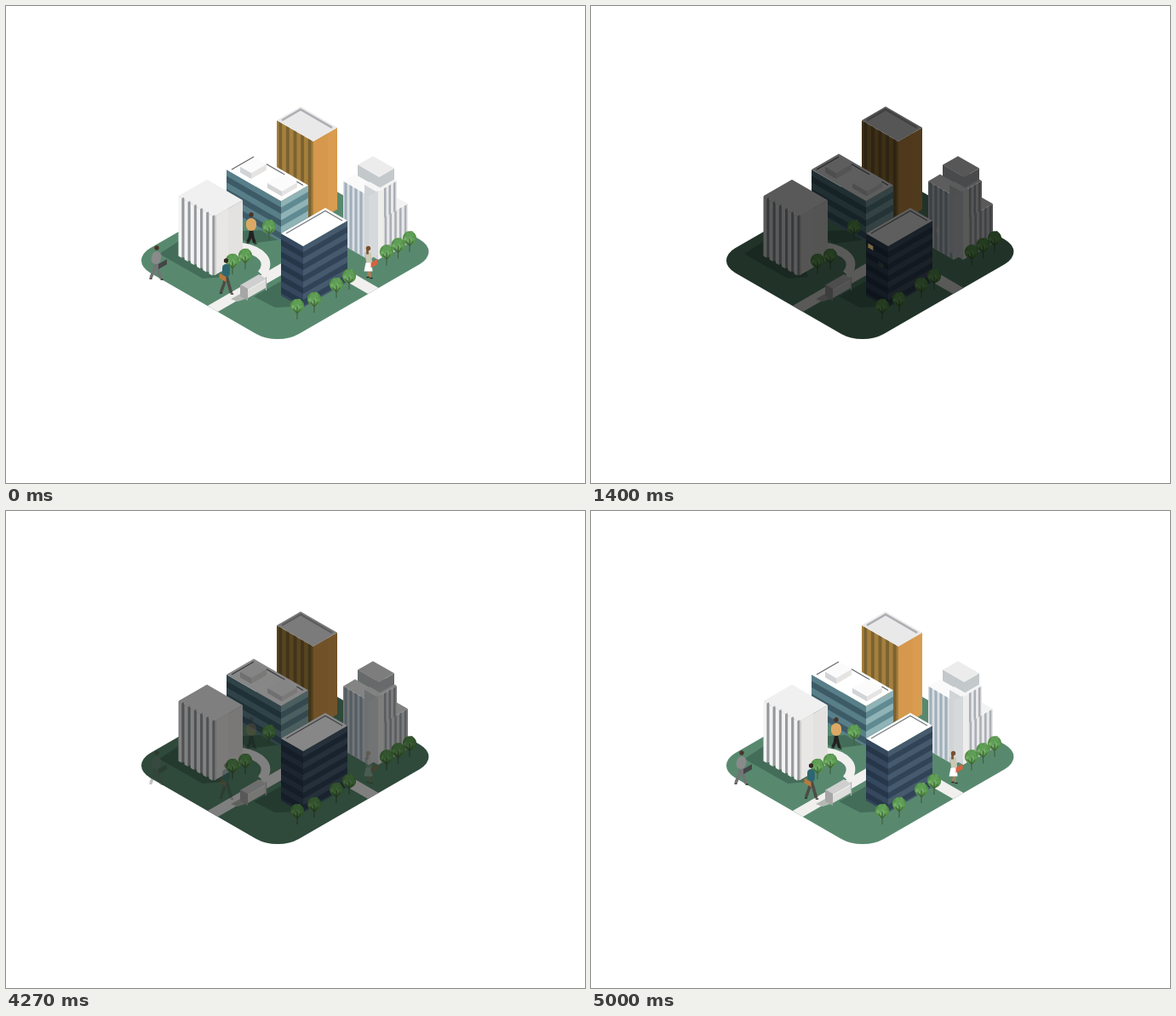
Recreate the animation shown at these times as an HTML page. Size 680 px wide and 560 px high, loop 7.07 s.

```html
<!DOCTYPE html>
<html lang="en">
<head>
<meta charset="utf-8">
<title>City day and night</title>
<style>
html, body { margin: 0; width: 100%; height: 100%; overflow: hidden; background: #fff; }
svg { position: absolute; left: 0; top: 0; width: 680px; height: 560px; }
#city { animation: dusk 7070ms infinite; }
.person { animation: walkers 7070ms infinite; }
.light { opacity: 0; animation: glow 7070ms linear infinite both; }
@keyframes dusk {
  0%, .99% { filter: brightness(1); animation-timing-function: cubic-bezier(.37, 0, .63, 1); }
  19.8% { filter: brightness(.37); }
  55.16% { filter: brightness(.37); animation-timing-function: cubic-bezier(.37, 0, .63, 1); }
  70.72%, 100% { filter: brightness(1); }
}
@keyframes walkers {
  0%, 6.3% { opacity: 1; animation-timing-function: ease-in-out; }
  19.8% { opacity: 0; }
  56.9% { opacity: 0; animation-timing-function: ease-in-out; }
  65.8%, 100% { opacity: 1; }
}
@keyframes glow {
  0%, 19.2% { opacity: 0; }
  20.3%, 48.1% { opacity: 1; }
  49.2%, 100% { opacity: 0; }
}
</style>
</head>
<body>
<svg id="city" viewBox="0 0 680 560"></svg>
<svg id="lights" viewBox="0 0 680 560"></svg>
<script>
const K = .577; // isometric slope
let out = [], seed = 7;
const random = () => (seed = seed * 16807 % 2147483647) / 2147483647;
const poly = (pts, fill, more = '') => out.push(`<polygon points="${pts}" fill="${fill}" ${more}/>`);
const line = (d, color, w, more = '') =>
  out.push(`<path d="${d}" fill="none" stroke="${color}" stroke-width="${w}" ${more}/>`);
const dot = (x, y, r, fill) => out.push(`<circle cx="${x}" cy="${y}" r="${r}" fill="${fill}"/>`);

// Walls start at the front corner; negative w runs left, positive runs right.
const rise = (y, w) => y - K * Math.abs(w);
const wall = (x, y, w, h, fill, more) =>
  poly([x, y, x + w, rise(y, w), x + w, rise(y, w) + h, x, y + h], fill, more);
const roof = (x, y, l, r, fill) =>
  poly([x, y, x - l, rise(y, l), x - l + r, rise(y, l + r), x + r, rise(y, r)], fill);

function box(x, y, l, r, h, left, right, top) {
  wall(x, y, -l, h, left);
  wall(x, y, r, h, right);
  roof(x, y, l, r, top);
}

function rim(x, y, l, r, inset, color, w, more) {
  y -= 2 * K * inset; l -= 2 * inset; r -= 2 * inset;
  line(`M${x - l} ${rise(y, l)}L${x - l + r} ${rise(y, l + r)}L${x + r} ${rise(y, r)}`, color, w, more);
}

function floors(x, y, w, h, step, light, dark) {
  wall(x, y, w, h, light);
  for (let v = step / 2; v < h; v += step) wall(x, y + v, w, Math.min(step / 2, h - v), dark);
}

function stripes(x, y, w, h, count, light, dark, share = .45) {
  wall(x, y, w, h, light);
  for (let i = 0; i < count; i++) {
    const start = w * (i + .5 - share / 2) / count;
    wall(x + start, rise(y, start), w * share / count, h, dark);
  }
}

function ground() {
  const flat = (x, y, w, h, fill, rx = 0) => out.push(
    `<rect x="${x}" y="${y}" width="${w}" height="${h}" rx="${rx}" fill="${fill}" transform="matrix(1 ${K} -1 ${K} 0 0)"/>`);
  const shade = '#446d59', road = '#f1f0ef';
  flat(331, -5.5, 174.6, 192.2, '#58896f', 25);
  poly('203,276 180,291 231,320 255,318 245,290', shade);
  poly('278,264 278,274 286,279 325,274 325,262', shade);
  poly('325,322 291,341 316,354 340,353', shade);
  flat(423.5, 68, 12, 118.7, road);
  flat(423.5, 68, 82.1, 12.4, road);
  line('M276 283C300 287 313 300 300 315', road, 10.5);
}

function orangeTower() {
  stripes(361, 159, -43, 98, 5, '#a5803c', '#7b6233');
  wall(361, 159, 28, 96, '#d99c50');
  wall(361, 159, 17, 96, '#d5984c');
  roof(361, 159, 43, 28, '#e9e9ea');
  rim(361, 159, 43, 28, 3, '#adadb2', 2.4);
}

function tealOffice() {
  floors(323, 229, -64, 48, 15, '#587f89', '#3d5b67');
  floors(323, 229, 32, 48, 15, '#8fb3b6', '#608a92');
  roof(323, 229, 64, 32, '#fff');
  rim(323, 229, 64, 32, 3, '#62666b', 1.2, 'stroke-dasharray="30 17 25 16 10"');
  box(288, 196, 13, 18, 7, '#d2d4d6', '#e6e4e3', '#fbfbfb');
  box(324, 217.5, 17, 18, 6, '#d2d4d6', '#e6e4e3', '#fbfbfb');
}

function finOffice() {
  box(245, 247, 42, 33, 69, '#b4b6b8', '#e4e2e0', '#f0f0f0');
  wall(245, 247, 16, 69, '#e9e7e5');
  for (let x = 206.5; x < 246; x += 7.2)
    box(x, rise(248, 245 - x), 4, 2.6, 70, '#f4f4f4', '#96999c', '#f0f0f0');
  wall(245, 247, 2, 69, '#cfcdcc');
}

function whiteTowers() {
  roof(443, 249, 14, 29, '#f3f3f3');
  stripes(437, 218, 22, 50, 4, '#e8e8e8', '#a9aeb6');
  roof(437, 218, 18, 22, '#f3f3f3');
  box(438, 201, 25, 18, 13, '#c3c8ca', '#c4c9cb', '#ececec');
  wall(438, 201, -25, 20, '#c3c8ca');
  stripes(443, 249, 29, 47, 5, '#e8e8e8', '#aaafb6');
  roof(426, 223, 30, 14, '#fafafa');
  stripes(426, 223, -30, 75, 5, '#dadee1', '#9dafbb', .52);
  box(437, 219, 16, 6, 79, '#d0d4d6', '#ededec', '#f6f6f6');
  wall(426, 223, 11, 75, '#d6d9db');
}

function blueOffice() {
  floors(349, 282, -26, 73, 14, '#35485d', '#27374a');
  floors(349, 282, 52, 72, 14, '#465a6d', '#304357');
  roof(349, 282, 26, 52, '#fff');
  rim(349, 282, 26, 52, 3, '#73777c', 1.1);
}

function shelter() {
  poly('264,344 275,338 284,343 272,347', '#b4b8b3');
  wall(284, 334, 21, 9, '#dededd');
  roof(284, 333, 9, 22, '#cfcfcf');
  wall(284, 332, -9, 14, '#a6a6a6');
  line('M305.5 318V334', '#b5b5b5', 1.2);
}

function tree(x, y) {
  dot(x, y, 8.2, '#559049');
  for (let i = 0; i < 12; i++) {
    const a = i * 2.4, r = 1.8 * Math.sqrt(i);
    dot(x + r * Math.cos(a), y - 1 + r * Math.sin(a), 2, i % 3 ? '#609f57' : '#74ae68');
  }
  line(`M${x} ${y + 1}V${y + 16}M${x - 4} ${y + 4}L${x} ${y + 9}L${x + 4} ${y + 4}`, '#41613a', 1.2);
}

function treeRow(x0, y0, x1, y1, count) {
  for (let i = 0; i < count; i++) {
    const u = i / (count - 1);
    tree(x0 + (x1 - x0) * u, y0 + (y1 - y0) * u);
  }
}

// x,y is the top of the head; lean shifts the hips.
function person(x, y, tall, wide, lean, stride, look, extra) {
  const hip = x + lean, low = y + tall, round = 'stroke-linecap="round"';
  out.push('<g class="person">');
  line(`M${hip} ${y + 20}L${hip - stride * .4} ${y + 30}L${hip - stride} ${low - 2}`, look.legs, look.leg || 3.6);
  line(`M${hip} ${y + 20}L${hip + stride * .5} ${y + 30}L${hip + stride} ${low - 1}`, look.legs, look.leg || 3.6);
  line(`M${hip - stride - 1} ${low - 1}h2M${hip + stride} ${low}h2`, '#2b2927', 1.6, round);
  line(`M${x} ${y + 7 + wide / 2}L${hip} ${y + 22 - wide / 2}`, look.top, wide, round);
  dot(x, y + 3, 2.7, look.hair);
  if (extra) extra(hip, y);
  out.push('</g>');
}

// Each cell of a wall's window grid is lit by chance.
function windows(x, y, w, cols, rows, step, chance, size = 6) {
  for (let i = 0; i < cols * rows; i++) {
    if (random() > chance) continue;
    const at = w * (i % cols + .3) / cols, dir = Math.sign(w);
    const delay = Math.round(random() * 500);
    wall(x + at, rise(y, at) + Math.floor(i / cols) * step, dir * size, 5, '#e6be68',
      `class="light" style="animation-delay:${delay}ms"`);
  }
}

ground();
orangeTower();
tealOffice();
finOffice();
tree(309, 259);
person(288, 242, 37, 12, 0, 4, { top: '#dca965', legs: '#222', hair: '#4b3328' });
whiteTowers();
blueOffice();
treeRow(281, 293, 266, 299, 2);
shelter();
person(177, 281, 40, 11, -1, 6, { top: '#8b8a8b', legs: '#727375', hair: '#4b3429' },
  (x, y) => wall(x + 3, y + 22, 10, 6, '#444446'));
person(258.5, 296, 42, 9, 0, 6, { top: '#2e6670', legs: '#4f4b45', hair: '#332a27' },
  (x, y) => wall(x, y + 22, -8, 6, '#b9793c'));
person(425.5, 281.5, 38, 7, 1, 1.5, { top: '#cbc8b4', legs: '#b77f55', hair: '#79502f', leg: 1.8 }, (x, y) => {
  poly([x - 4, y + 20, x + 3, y + 20, x + 4, y + 30, x - 6, y + 30], '#fff');
  wall(x + 2, y + 20, 8, 6, '#d8623f');
  line(`M${x - 2} ${y + 4}v6`, '#79502f', 2.6);
});
treeRow(474, 272.5, 447, 288.5, 3);
treeRow(403, 317, 388, 327, 2);
treeRow(362, 344, 342, 352, 2);
document.getElementById('city').innerHTML = out.join('');

out = [];
windows(353, 166, -35, 4, 3, 11, .5, 5);
windows(323, 236, -64, 5, 2, 15, .6);
windows(323, 236, 32, 3, 2, 14, .9);
windows(240, 254, -30, 4, 4, 11, .42, 4);
windows(424, 232, -26, 4, 4, 13, .5, 4);
windows(445, 257, 26, 4, 2, 12, .6, 3);
windows(347, 291, -24, 2, 3, 14, .4);
windows(352, 287, 50, 4, 4, 14, .55);
document.getElementById('lights').innerHTML = out.join('');
</script>
</body>
</html>
```
